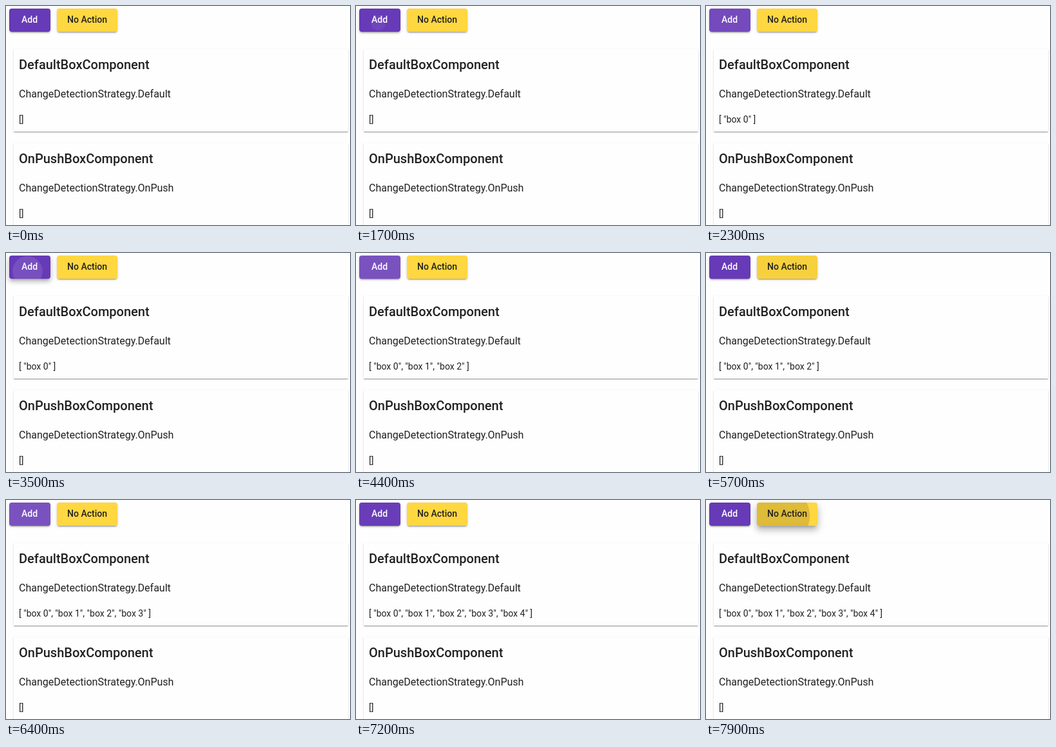
An HTML page for the animation above (8000 ms loop, 534 by 340 pixels).

```html
<!DOCTYPE html>
<html lang="en">
<head>
<meta charset="utf-8">
<title>Change detection</title>
<style>
  html, body { margin: 0; width: 100%; height: 100%; overflow: hidden; background: #fefefe; }
  #stage { position: relative; width: 534px; height: 340px; overflow: hidden; }
  .card {
    position: absolute; left: 12px; width: 519px; height: 128px; background: #fefefe;
    box-shadow: 0 2px 1px -1px rgba(0,0,0,.2), 0 1px 1px rgba(0,0,0,.14), 0 1px 3px rgba(0,0,0,.12);
  }
  .button { position: absolute; top: 4px; height: 36px; border-radius: 4px; }
  .clip { position: absolute; inset: 0; overflow: hidden; border-radius: 4px; }
  .ripple { position: absolute; border-radius: 50%; }
  svg { position: absolute; left: 0; top: 0; }
  text { font-family: Roboto, sans-serif; font-size: 14px; fill: #212121; white-space: pre; }
  .label { font-weight: 500; }
  .title { font-size: 20px; font-weight: 500; }
  .sub { font-size: 16px; }
</style>
</head>
<body>
<div id="stage">
  <div class="card" style="top:67px"></div>
  <div class="card" style="top:213px"></div>
  <svg width="534" height="340">
    <text class="title" x="20" y="98">DefaultBoxComponent</text>
    <text class="sub" x="20" y="142">ChangeDetectionStrategy.Default</text>
    <text id="list" x="20" y="181">[]</text>
    <text class="title" x="20" y="244">OnPushBoxComponent</text>
    <text class="sub" x="20" y="288">ChangeDetectionStrategy.OnPush</text>
    <text x="20" y="327">[]</text>
  </svg>
</div>
<script>
const LOOP = 8000, STEP = 100;
const ENTER = 450, EXIT = 400, LIFT = 280;
const stage = document.getElementById('stage');
const list = document.getElementById('list');

const buttons = {
  add: { x: 5, w: 64, text: 'Add', textX: 24, fill: '#673ab7', ink: '#fff', ripple: '#fff', alpha: 0.2 },
  none: { x: 79, w: 94, text: 'No Action', textX: 95, fill: '#ffd740', ink: '#212121', ripple: '#000', alpha: 0.17 }
};

// Press time, release time and pointer position on the stage.
const presses = [
  { on: 'add', down: 1660, up: 1800, fade: 2196, x: 34, y: 26 },
  { on: 'add', down: 3400, up: 3530, x: 33, y: 28 },
  { on: 'add', down: 3893, up: 4020, x: 33, y: 28 },
  { on: 'none', down: 5066, up: 5190, x: 115, y: 26 },
  { on: 'add', down: 5893, up: 6020, x: 35, y: 27 },
  { on: 'add', down: 6490, up: 6620, x: 35, y: 27 },
  { on: 'none', down: 7719, up: 8100, x: 115, y: 25 }
];

const clamp = v => Math.min(1, Math.max(0, v));

function bezier(x1, y1, x2, y2) {
  const at = (a, b, t) => 3 * (1 - t) * (1 - t) * t * a + 3 * (1 - t) * t * t * b + t * t * t;
  return v => {
    if (v <= 0 || v >= 1) return clamp(v);
    let lo = 0, hi = 1;
    for (let i = 0; i < 24; i++) {
      const mid = (lo + hi) / 2;
      if (at(x1, x2, mid) < v) lo = mid; else hi = mid;
    }
    return at(y1, y2, lo);
  };
}
const easeOut = bezier(0, 0, 0.2, 1);
const easeInOut = bezier(0.4, 0, 0.2, 1);

function addDiv(parent, className, style) {
  const el = document.createElement('div');
  el.className = className;
  Object.assign(el.style, style);
  return parent.appendChild(el);
}

for (const b of Object.values(buttons)) {
  b.el = addDiv(stage, 'button', { left: b.x + 'px', width: b.w + 'px', background: b.fill });
  b.clip = addDiv(b.el, 'clip', {});
  b.el.insertAdjacentHTML('beforeend',
    `<svg width="${b.w}" height="36"><text class="label" x="${b.textX - b.x}" y="22" style="fill:${b.ink}">${b.text}</text></svg>`);
}

for (const p of presses) {
  const b = buttons[p.on];
  p.radius = Math.hypot(Math.max(p.x - b.x, b.x + b.w - p.x), Math.max(p.y - 4, 40 - p.y));
  p.fade = p.fade || Math.max(p.up, p.down + ENTER);
  p.el = addDiv(b.clip, 'ripple', {
    left: p.x - b.x - p.radius + 'px', top: p.y - 4 - p.radius + 'px',
    width: 2 * p.radius + 'px', height: 2 * p.radius + 'px', background: b.ripple
  });
}

// Resting and pressed shadows: y offset, blur, spread, opacity.
const rest = [[3, 1, -2, 0.2], [2, 2, 0, 0.14], [1, 5, 0, 0.12]];
const raised = [[5, 5, -3, 0.2], [8, 10, 1, 0.14], [3, 14, 2, 0.12]];

function shadow(k) {
  return rest.map((layer, i) => {
    const [y, blur, spread, a] = layer.map((v, j) => v + (raised[i][j] - v) * k);
    return `0 ${y}px ${blur}px ${spread}px rgba(0,0,0,${a})`;
  }).join(',');
}

function lift(p, t) {
  const rise = end => easeInOut(clamp((end - p.down) / LIFT));
  return t < p.up ? rise(t) : rise(p.up) * (1 - easeInOut(clamp((t - p.up) / LIFT)));
}

function draw(t) {
  for (const p of presses) {
    const grow = easeOut(clamp((t - p.down) / ENTER));
    const left = 1 - easeOut(clamp((t - p.fade) / EXIT));
    p.el.style.transform = `scale(${grow})`;
    p.el.style.opacity = buttons[p.on].alpha * grow * left;
  }
  for (const [name, b] of Object.entries(buttons)) {
    const heights = presses.filter(p => p.on === name).map(p => lift(p, t));
    b.el.style.boxShadow = shadow(Math.max(...heights));
  }
  const count = presses.filter(p => p.on === 'add' && t >= p.up).length;
  const items = Array.from({ length: count }, (_, i) => `"box ${i}"`);
  list.textContent = count ? `[ ${items.join(', ')} ]` : '[]';
}

const start = performance.now();
function frame() {
  const t = (performance.now() - start) % LOOP;
  draw(Math.floor(t / STEP) * STEP);
  requestAnimationFrame(frame);
}
draw(0);
requestAnimationFrame(frame);
</script>
</body>
</html>
```
